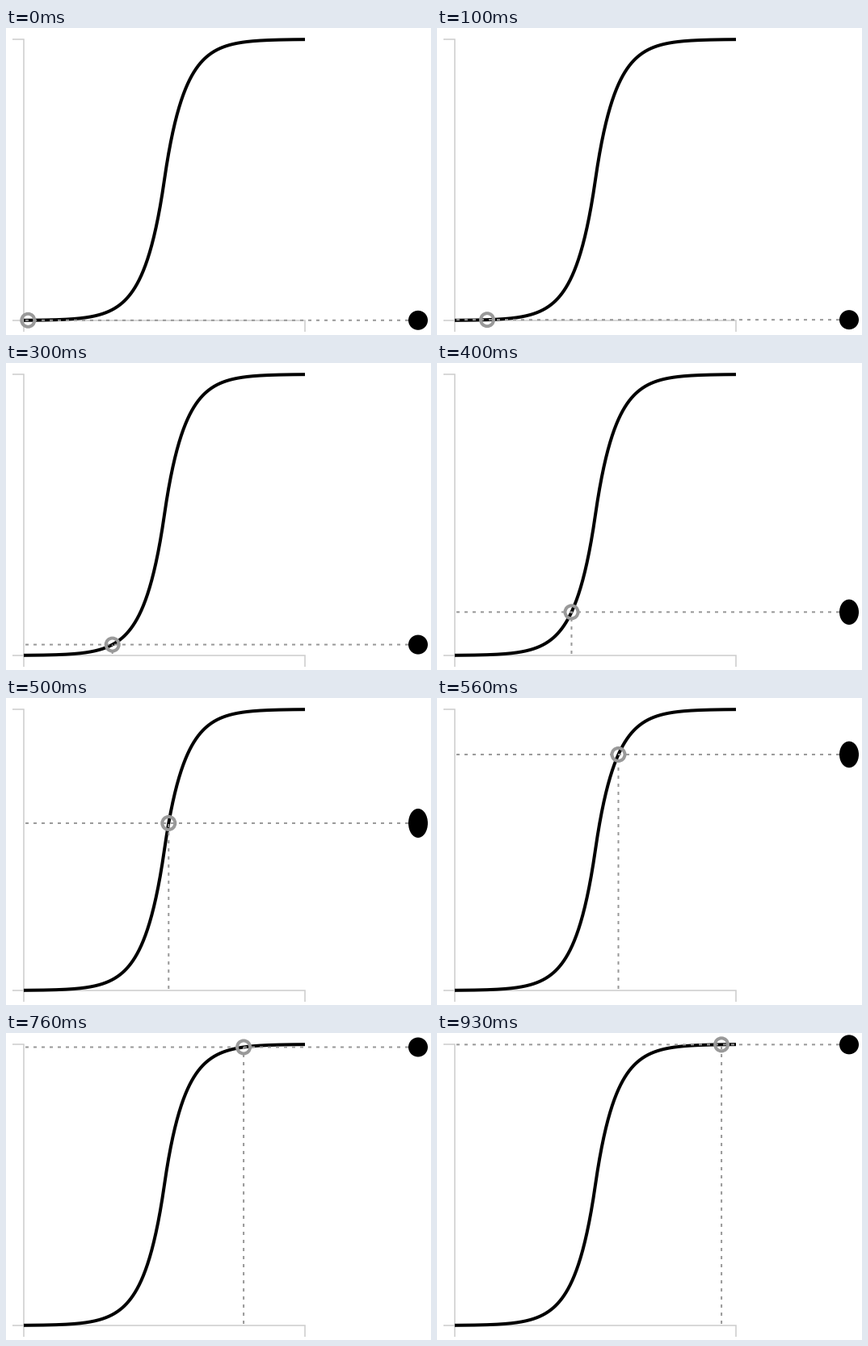
Animation, 526 px wide and 380 px high, one loop 960 ms. Source, as a matplotlib script:

```python
import numpy as np
import matplotlib.pyplot as plt
from matplotlib.animation import FuncAnimation
from matplotlib.patches import Circle, Ellipse

W, H = 526, 380
LEFT, TOP, SIZE = 22, 14, 348
RIGHT, BOTTOM = LEFT + SIZE, TOP + SIZE
TICK = 14
BALL_X, BALL_R = 510, 12
GREY, PALE = "#999999", "#cccccc"
STEP, START = 1 / 30, 0.0152

# At 72 dpi one point is one pixel
plt.rcParams.update({"path.snap": False, "lines.scale_dashes": False})
fig = plt.figure(figsize=(W / 72, H / 72), dpi=72, facecolor="white")
ax = fig.add_axes([0, 0, 1, 1])
ax.set_xlim(0, W)
ax.set_ylim(H, 0)
ax.axis("off")


def ease(t):
    """Exponential ease in and out."""
    return np.where(t < 0.5, 2 ** (20 * t - 11), 1 - 2 ** (9 - 20 * t))


def speed(t):
    return 20 * np.log(2) * 2 ** (-abs(20 * t - 10) - 1)


def stroke(xs, ys, color, width, **kw):
    line, = ax.plot(xs, ys, color=color, lw=width, solid_capstyle="butt",
                    solid_joinstyle="miter", dash_capstyle="butt", **kw)
    return line


stroke([LEFT - TICK, LEFT, LEFT, LEFT - TICK],
       [TOP, TOP, BOTTOM, BOTTOM], PALE, 1.5)
stroke([LEFT, LEFT, RIGHT, RIGHT],
       [BOTTOM + TICK, BOTTOM, BOTTOM, BOTTOM + TICK], PALE, 1.5)

ts = np.linspace(0, 1, 401)
stroke(LEFT + SIZE * ts, BOTTOM - SIZE * ease(ts), "black", 4)

dashes = (0, (4, 6))
across = stroke([], [], GREY, 2, linestyle=dashes)
down = stroke([], [], GREY, 2, linestyle=dashes)
ring = ax.add_patch(Circle((0, 0), 8, fill=False, ec=GREY, lw=4, zorder=3))
ball = ax.add_patch(Ellipse((0, 0), 2 * BALL_R, 2 * BALL_R,
                            fc="black", lw=0, zorder=4))


def draw(i):
    # Ticks of 10 ms, with a new pose about every 33 ms
    t = START + STEP * ((3 * i + 2) // 10)
    x = LEFT + SIZE * t
    y = BOTTOM - SIZE * float(ease(t))
    across.set_data([LEFT + 2, BALL_X], [y, y])
    down.set_data([x, x], [BOTTOM - 2, min(y, BOTTOM - 2)])
    ring.center = (x, y)
    ball.center = (BALL_X, y)
    ball.height = 2 * BALL_R * np.clip(speed(t) / 1.64, 1, 1.5)
    return across, down, ring, ball


anim = FuncAnimation(fig, draw, frames=96, interval=10, repeat=True,
                     repeat_delay=0)
plt.show()
```
